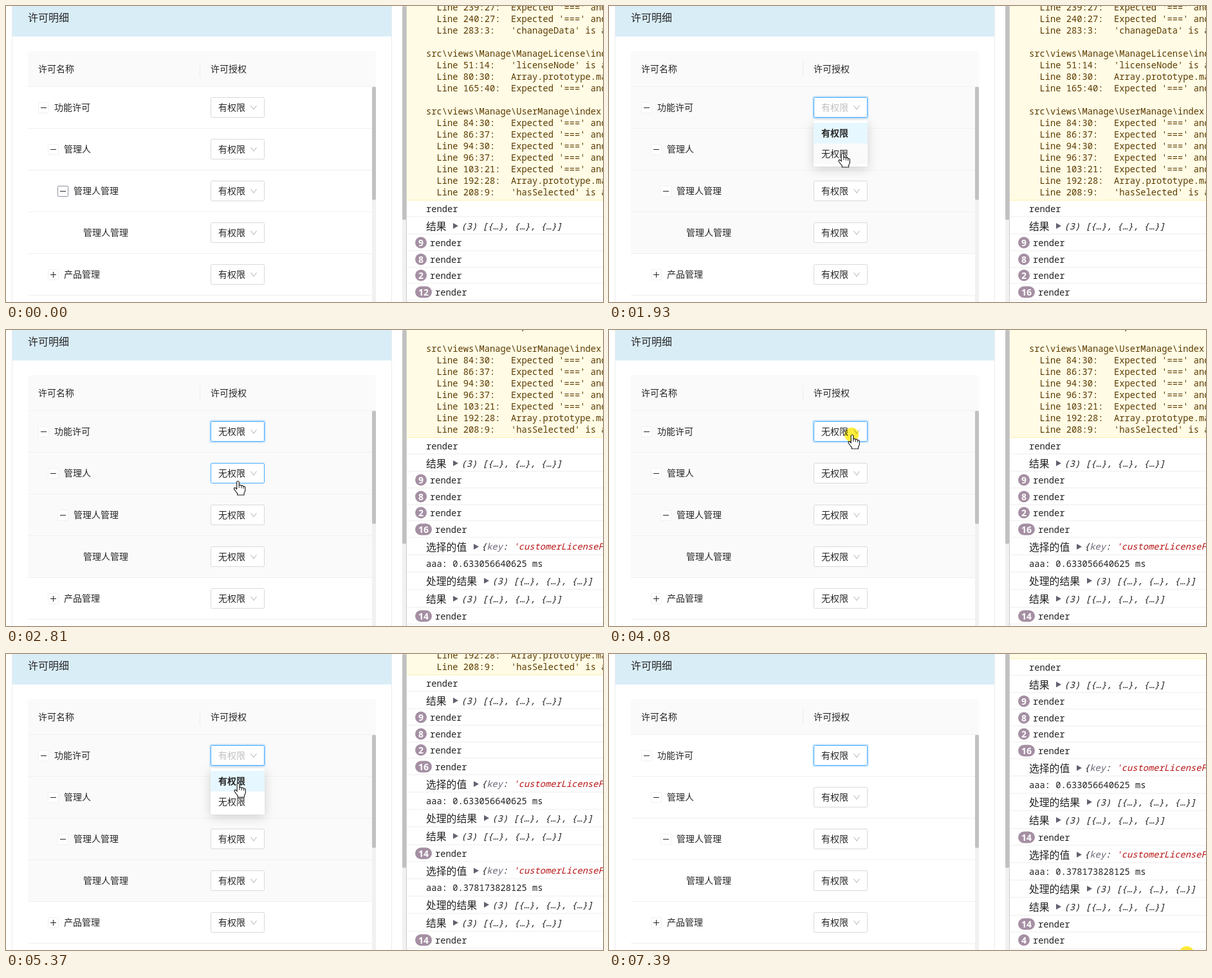
An HTML page for the animation above (7.46 s loop, 928x461 px).

```html
<!DOCTYPE html>
<html lang="zh-CN">
<head>
<meta charset="utf-8">
<title>许可明细</title>
<style>
html, body { margin: 0; width: 100%; height: 100%; overflow: hidden; background: #fff; }
svg { display: block; width: 928px; height: 461px; }
text { white-space: pre; }
.ui { font: 14px "Noto Sans CJK SC", "Noto Sans CJK", sans-serif; fill: #262626; }
.title { font-size: 16px; }
.mono { font: 13.75px "Noto Sans Mono", monospace; fill: #222; }
.cjk { font: 15.8px "Noto Sans CJK SC", "Noto Sans CJK", sans-serif; fill: #222; }
.warn { fill: #5c3c00; }
.it { font-style: italic; }
.key { fill: #6b6375; }
.str { fill: #b81414; }
.num { font: bold 14px "Open Sans", sans-serif; fill: #fff; text-anchor: middle; }
.menu { filter: drop-shadow(0 4px 8px rgba(0,0,0,.17)); }
.halo { mix-blend-mode: multiply; }
</style>
</head>
<body>
<svg id="stage" viewBox="0 0 928 461"></svg>
<script>
const LOOP = 7460;
const stage = document.getElementById('stage');

function add(parent, tag, attrs, content) {
  const el = document.createElementNS('http://www.w3.org/2000/svg', tag);
  for (const k in attrs) el.setAttribute(k, attrs[k]);
  if (content !== undefined) el.textContent = content;
  parent.appendChild(el);
  return el;
}
const rect = (p, x, y, width, height, fill, more) => add(p, 'rect', { x, y, width, height, fill, ...more });
const text = (p, x, y, cls, s) => add(p, 'text', { x, y, class: cls }, s);
const group = p => add(p, 'g', {});
const path = (p, d, stroke, more) => add(p, 'path', { d, stroke, fill: 'none', ...more });
const show = (el, on) => el.setAttribute('visibility', on ? 'visible' : 'hidden');

// ---- permission panel ----
rect(stage, 0, 0, 928, 461, '#fff');
rect(stage, 9, 0, 1, 461, '#ececec');
rect(stage, 599, 0, 1, 461, '#ececec');
rect(stage, 10, 0, 589, 47.5, '#d9edf7');
text(stage, 34, 24, 'ui title', '许可明细');
path(stage, 'M34 125V74Q34 70 38 70H571Q575 70 575 74V125Z', 'none', { fill: '#fafafa' });
rect(stage, 301, 87, 1, 23, '#ececec');
text(stage, 50, 103, 'ui', '许可名称');
text(stage, 318, 103, 'ui', '许可授权');

const names = [
  ['功能许可', 75, '-'], ['管理人', 90, '-'], ['管理人管理', 105, '-'],
  ['管理人管理', 120, ''], ['产品管理', 90, '+']
];
const rows = names.map(([name, x, sign], i) => {
  const mid = 158 + 65 * i;
  const bg = rect(stage, 34, mid - 32, 535, 64, '#fff');
  rect(stage, 34, mid + 32, 535, 1, '#f0f0f0');
  let box;
  if (sign) {
    const cx = x - 16.5, cy = mid + .5;
    box = rect(stage, cx - 8, cy - 8, 16, 16, '#fff', { stroke: '#f0f0f0', rx: 1 });
    path(stage, `M${cx - 4.5} ${cy}h9` + (sign === '+' ? `M${cx} ${cy - 4.5}v9` : ''), '#262626');
  }
  text(stage, x, mid + 5, 'ui', name);
  const glow = rect(stage, 317, mid - 17, 86, 34, 'none',
    { stroke: '#1890ff', 'stroke-opacity': .2, 'stroke-width': 2, rx: 3 });
  const frame = rect(stage, 318.5, mid - 15.5, 83, 31, '#fff', { rx: 2 });
  const value = text(stage, 330, mid + 5, 'ui', '');
  path(stage, `M380.5 ${mid - 3}l4.5 6l4.5 -6`, '#bfbfbf', { 'stroke-width': 1.1 });
  return { mid, bg, box, glow, frame, value };
});
rect(stage, 34, 125, 541, 1, '#f0f0f0');
rect(stage, 569, 126, 6, 335, '#f1f1f1');
rect(stage, 569, 126, 6, 176, '#c1c1c1', { rx: 2 });

const menu = add(stage, 'g', { class: 'menu' });
rect(menu, 318, 178, 84, 72, '#fff', { rx: 2 });
const options = ['有权限', '无权限'].map((label, i) => ({
  bg: rect(menu, 318, 182 + 32 * i, 84, 32, '#fff'),
  text: text(menu, 330, 203 + 32 * i, 'ui', label)
}));

// ---- page scrollbar and console ----
rect(stage, 616, 0, 6, 461, '#f1f1f1');
rect(stage, 616, 0, 6, 333, '#c1c1c1', { rx: 2 });
const view = add(stage, 'svg', { x: 0, y: 0, width: 928, height: 461 });
rect(view, 622, 0, 306, 461, '#fff');
const log = group(view);
rect(log, 622, -20, 306, 323, '#fffbe5');
rect(log, 622, 302, 306, 1, '#fff0b3');
rect(view, 622, 0, 1, 461, '#cdcdcd');

const eq = "Expected '===' and instead saw '=='";
const unused = ' is assigned a value but never used';
const fn = 'Array.prototype.map() expects a return value';
const warnings = [
  ['239:27', eq], ['240:27', eq], ['283:3', "'chanageData'" + unused], null,
  'src\\views\\Manage\\ManageLicense\\index.js',
  ['51:14', "'licenseNode'" + unused], ['80:30', fn], ['165:40', eq], null,
  'src\\views\\Manage\\UserManage\\index.js',
  ['84:30', eq], ['86:37', eq], ['94:30', eq], ['96:37', eq], ['103:21', eq],
  ['192:28', fn], ['208:9', "'hasSelected'" + unused]
];
warnings.forEach((w, i) => {
  if (!w) return;
  const s = typeof w === 'string' ? w : '  Line ' + (w[0] + ':').padEnd(9) + w[1];
  text(log, 653, 7 + 18 * i, 'mono warn', s);
});

const badges = [];
function render(y, count) {
  let x = 653;
  if (count) {
    const w = count > 9 ? 26 : 18;
    rect(log, 636, y - 9.5, w, 18, '#a58fa3', { rx: 9 });
    badges.push(text(log, 636 + w / 2, y + 4.5, 'num', count));
    x = 641 + w;
  }
  text(log, x, y + 5, 'mono', 'render');
}
function labelled(y, label) {
  text(log, 653, y + 5.5, 'cjk', label);
  const x = 663 + 16 * label.length;
  path(log, `M${x} ${y - 5}l8 4.5l-8 4.5Z`, 'none', { fill: '#655f70' });
  return x + 12;
}
const result = (y, label) => text(log, labelled(y, label) + .5, y + 4.5, 'mono it', '(3) [{…}, {…}, {…}]');
function choice(y, time) {
  const x = labelled(y, '选择的值');
  const line = text(log, x, y + 4, 'mono it', '{');
  add(line, 'tspan', { class: 'key' }, 'key');
  add(line, 'tspan', {}, ': ');
  add(line, 'tspan', { class: 'str' }, "'customerLicenseFunction'");
  text(log, 653, y + 31, 'mono', `aaa: ${time} ms`);
  result(y + 53, '处理的结果');
  result(y + 81, '结果');
  render(y + 108, 14);
}
render(316);
result(343, '结果');
[[369, 9], [395, 8], [420, 2], [446, 12]].forEach(([y, n]) => render(y, n));
choice(473, '0.633056640625');
choice(608, '0.378173828125');
render(741, 4);
for (const y of [328, 355, 381, 407, 432, 458, 485, 512, 539, 567, 593, 620, 647, 674, 702, 728, 754])
  rect(log, 623, y - .5, 305, 1, '#ededed');

// ---- pointer ----
const halo = add(stage, 'circle', { r: 11, fill: '#ffee38', class: 'halo' });
const ink = { fill: '#fff', 'stroke-width': 1.2, 'stroke-linejoin': 'round' };
const arrow = path(stage, 'M0 0V16L3.8 12.6L6.3 18.6L8.8 17.5L6.3 11.6H11.3Z', '#222', ink);
const hand = group(stage);
const shape = add(hand, 'g', { transform: 'translate(1 0)' });
path(shape, 'M-1.8 1.5Q0 -1 1.8 1.5V7Q3.6 5.6 5.3 7.6Q7.2 6.5 8.5 8.6Q11 8 11.3 10.5V15' +
  'Q11 17.5 9.5 19V22H-.8V19.5Q-2.8 17.5 -5.8 13Q-6.5 10.8 -4.6 10.6Q-3.2 10.8 -1.8 13Z', '#222', ink);
path(shape, 'M1.8 7V11M5.3 8V11.5M8.5 9V12', '#222');

// time, x, y of the pointer tip
const track = [
  [530, 922, 404], [640, 745, 190], [750, 560, 33], [870, 470, 70], [1010, 388, 148], [1110, 378, 158],
  [1270, 376, 162], [1400, 370, 205], [1550, 362, 325], [1670, 360, 336], [1830, 361, 245],
  [1930, 362, 229], [2200, 362, 229], [2600, 359.5, 235],
  [3550, 359.5, 235], [3890, 377, 163], [4220, 377, 163], [4500, 362, 266], [4770, 360, 201],
  [6170, 360, 201], [6280, 450, 222], [6450, 643, 263], [6860, 898, 466]
];
const clicks = [1130, 2130, 4080, 5230, 7390];
const menus = [[1200, 2280], [4220, 5380]];

function pointer(t) {
  let i = track.findIndex(k => k[0] > t);
  if (i < 0) i = track.length;
  if (i === 0) return null;
  const a = track[i - 1], b = track[i] || a;
  const u = b === a ? 0 : (t - a[0]) / (b[0] - a[0]);
  const e = u * u * (3 - 2 * u) * .5 + u * .5;
  return { x: a[1] + (b[1] - a[1]) * e, y: a[2] + (b[2] - a[2]) * e };
}
const clamp = v => Math.max(0, Math.min(1, v));
const menuLevel = t => Math.max(...menus.map(([on, off]) =>
  Math.min(clamp((t - on) / 150), clamp(1 - (t - off) / 200))));

function tint(t, i) {
  if (i > 3 || t < (i ? 1350 + 60 * i : 1010) || t >= 6520) return '#fff';
  if (t < 6380) return '#fafafa';
  return i < 2 ? '#fcfcfc' : '#fff';
}

function draw(t) {
  const p = pointer(t);
  const level = menuLevel(t);
  const open = level > 0;
  const denied = t >= 2200 && t < 5300;
  const inside = (top, h) => p && p.x >= 318 && p.x <= 402 && p.y >= top && p.y <= top + h;
  const overMenu = open && inside(178, 72);
  let overSelect = false;

  rows.forEach((r, i) => {
    const focus = i === 0 && t >= 1170;
    const hover = !overMenu && inside(r.mid - 16, 32);
    overSelect = overSelect || hover;
    r.bg.setAttribute('fill', tint(t, i));
    r.frame.setAttribute('stroke', focus || hover ? '#40a9ff' : '#d9d9d9');
    show(r.glow, focus);
    r.value.textContent = denied ? '无权限' : '有权限';
    r.value.style.fill = i === 0 && open ? '#bfbfbf' : '';
  });
  rows[2].box.setAttribute('stroke', t < 70 ? '#8f8fa0' : t < 130 ? '#c8c8d0' : '#f0f0f0');

  show(menu, open);
  menu.setAttribute('opacity', level);
  menu.setAttribute('transform', `translate(0 ${178 * (.2 - .2 * level)}) scale(1 ${.8 + .2 * level})`);
  options.forEach((o, i) => {
    const chosen = i === (denied ? 1 : 0);
    const active = inside(182 + 32 * i, 32);
    o.bg.setAttribute('fill', chosen ? '#e6f7ff' : active ? '#fafafa' : '#fff');
    o.text.style.fontWeight = chosen ? 700 : 400;
  });

  badges[3].textContent = t < 1200 ? 12 : 16;
  const scroll = t < 2200 ? 0 : t < 5300 ? 135 : t < 6310 ? 270 : 295;
  log.setAttribute('transform', `translate(0 ${-scroll})`);

  const pressed = clicks.some(c => t >= c && t < c + 140);
  const isHand = overMenu || overSelect;
  show(halo, p && pressed);
  show(hand, p && isHand);
  show(arrow, p && !isHand);
  if (p) for (const el of [halo, hand, arrow]) el.setAttribute('transform', `translate(${p.x} ${p.y})`);
}

const start = performance.now();
function tick() {
  draw((performance.now() - start) % LOOP);
  requestAnimationFrame(tick);
}
tick();
</script>
</body>
</html>
```
